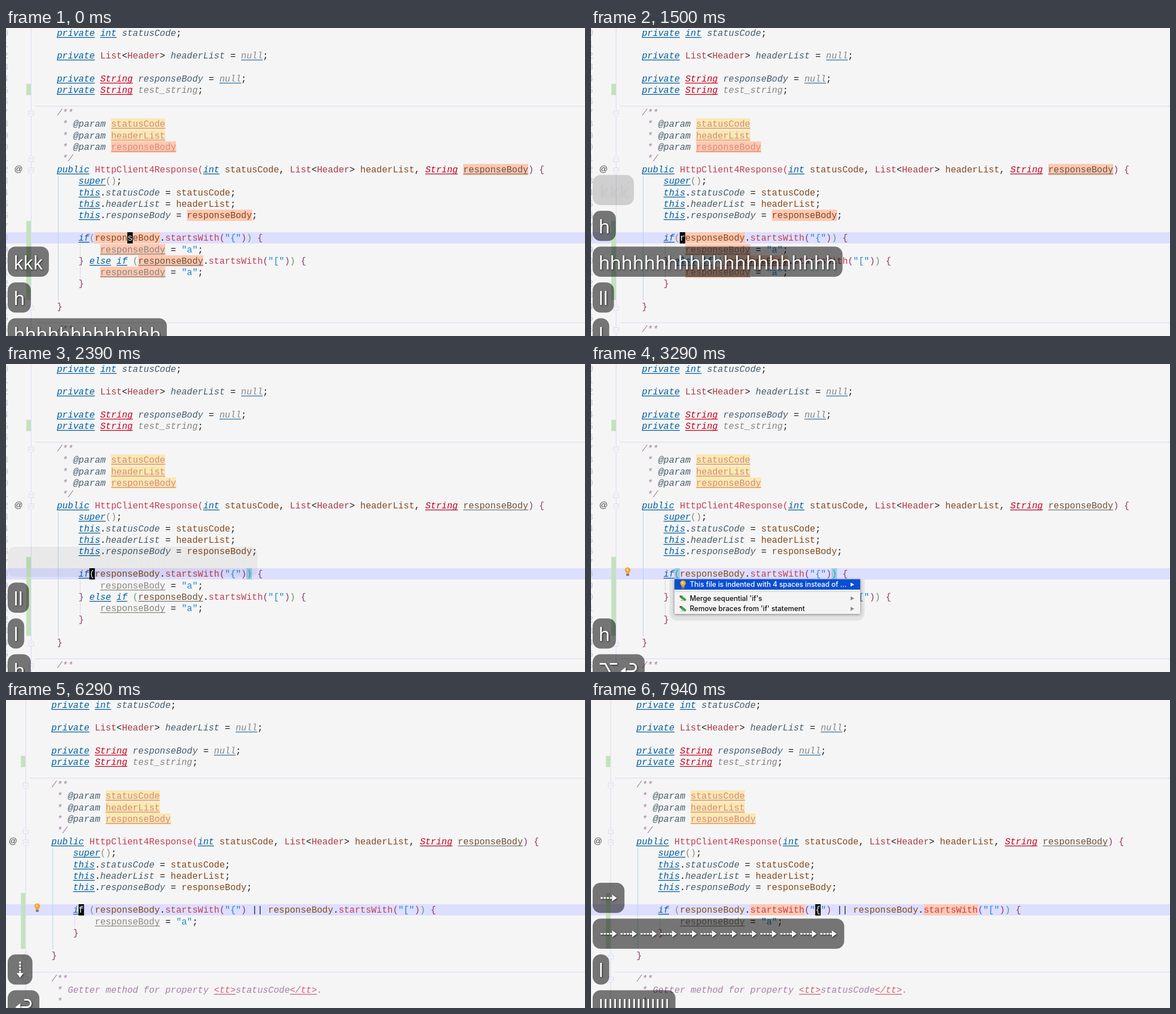
These frames come from a looping animation (1026 by 546 pixels, 8 s). An HTML page with a canvas:

```html
<!DOCTYPE html>
<html lang="en">
<head>
<meta charset="utf-8">
<title>Merging sequential ifs</title>
<style>
  html, body { margin: 0; width: 100%; height: 100%; overflow: hidden; background: #f5f5f5; }
  canvas { display: block; }
</style>
</head>
<body>
<canvas id="stage" width="1026" height="546"></canvas>
<script>
const ctx = document.getElementById('stage').getContext('2d');
const LOOP = 8000, MERGED = 5540, MENU = 2990;
const CHAR = 9.6, ROW = 20.2, CARET_ROW = 18;
const BG = '#f5f5f5', LAVENDER = '#d9d9f6', SALMON = '#ffc9b3';
const CODE = '16px "Liberation Mono", monospace';
const KEYS = '32.5px "Noto Sans", sans-serif';

// Moments at which the picture changes.
const steps = [0, 150, 300, 600, 750, 1050, 1500, 1650, 1800, 1950, 2240, 2390, 2540, 2690, 2840,
  2990, 3140, 3290, 3740, 3890, 4790, 4940, 5540, 5840, 6290, 6740, 6890, 7040, 7190, 7490, 7640, 7790, 7940];

// [time, caret column, highlighted word]
const carets = [
  [0, 13, 'responseBody'], [150, 8, 'responseBody'], [300, 4], [600, 5], [750, 6], [1050, 7],
  [1500, 7, 'responseBody'], [1950, 6], [MENU, -1], [MERGED, 5], [6740, 6], [6890, 10], [7040, 14],
  [7190, 18, 'responseBody'], [7490, 19, 'responseBody'], [7640, 23],
  [7790, 28, 'startsWith'], [7940, 33, 'startsWith']
];

// key, [time, repeat count] pairs, time when fully faded
const bubbles = [
  ['k', [[-2, 3]], 1560],
  ['h', [[-1, 1]], 1760],
  ['h', [[0, 13], [150, 17], [300, 21]], 2410],
  ['l', [[600, 1], [750, 2]], 2880],
  ['l', [[1050, 1]], 3220],
  ['h', [[1950, 1]], 3830],
  ['⌥↩', [[2840, 1]], 4850],
  ['⇣', [[4940, 1]], 6850],
  ['↩', [[MERGED, 1]], 7580],
  ['⇢', [[6740, 1]], 9000],
  ['⇢', [[6890, 4], [7040, 8], [7190, 12]], 9000],
  ['l', [[7490, 1]], 9500],
  ['l', [[7640, 5], [7790, 10], [7940, 15]], 9500]
];

// style letter: [colour, italic, underline colour, background]
const styles = {
  k: ['#005f9f', 1, '#005f9f'], S: ['#c4001f', 1, '#c4001f'], n: ['#858585', 1, '#2f74a8'],
  t: ['#a93a48'], f: ['#465d6c', 1], g: ['#848484', 1], c: ['#a67fa8', 1], a: ['#465d6c', 1],
  d: ['#d98878', 0, '#d98878', '#f8e9b4'], x: ['#d0607a', 1, '#d0607a'], m: ['#c03e57'],
  v: ['#84491f'], u: ['#8b857e', 0, '#8b857e'], w: ['#6f5138', 0, '#777777'], p: ['#1c1c1c'],
  b: ['#8c3c68'], q: ['#2188d6'], e: ['#5d9d6c'], o: ['#8d8a80']
};

// Segments are split by "¦"; the first letter of each is its style.
const shared = {
  0: 'kprivate¦p ¦kint¦p ¦fstatusCode¦p;',
  2: 'kprivate¦p ¦tList¦p<¦tHeader¦p> ¦fheaderList¦p = ¦nnull¦p;',
  4: 'kprivate¦p ¦SString¦p ¦fresponseBody¦p = ¦nnull¦p;',
  5: 'kprivate¦p ¦SString¦p ¦gtest_string¦p;',
  7: 'c/**',
  8: 'c * ¦a@param¦p ¦dstatusCode',
  9: 'c * ¦a@param¦p ¦dheaderList',
  10: 'c * ¦a@param¦p ¦dresponseBody',
  11: 'c */',
  12: 'kpublic¦p ¦mHttpClient4Response(¦kint¦p ¦vstatusCode¦p, ¦tList¦p<¦tHeader¦p> ¦vheaderList¦p, ¦SString¦p ¦wresponseBody¦b) {',
  13: 'p    ¦ksuper¦o()¦p;',
  14: 'p    ¦kthis¦p.¦fstatusCode¦p = ¦vstatusCode¦p;',
  15: 'p    ¦kthis¦p.¦fheaderList¦p = ¦vheaderList¦p;',
  16: 'p    ¦kthis¦p.¦fresponseBody¦p = ¦vresponseBody¦p;',
  19: 'p        ¦uresponseBody¦p = ¦q"a"¦p;'
};
const before = { ...shared,
  18: 'p    ¦kif¦o(¦vresponseBody¦p.¦mstartsWith¦b(¦q"{"¦b)¦e)¦b {',
  20: 'p    ¦b}¦p ¦kelse¦p ¦kif¦p ¦e(¦wresponseBody¦p.¦mstartsWith¦b(¦q"["¦b)¦e)¦b {',
  21: shared[19],
  22: 'p    ¦b}',
  24: 'b}',
  26: 'c/**'
};
const after = { ...shared,
  18: 'p    ¦kif¦p ¦o(¦vresponseBody¦p.¦mstartsWith¦b(¦q"{"¦b)¦p || ¦vresponseBody¦p.¦mstartsWith¦b(¦q"["¦b)¦e)¦b {',
  20: 'p    ¦b}',
  22: 'b}',
  24: 'c/**',
  25: 'c * Getter method for property ¦x<tt>¦cstatusCode¦x</tt>¦c.',
  26: 'c *'
};

const latest = (table, t) => table.filter(entry => entry[0] <= t).pop();
const rowTop = row => Math.round(ROW * row - 1.2);

function rect(color, x, y, w, h) {
  ctx.fillStyle = color;
  ctx.fillRect(x, y, w, h);
}
function poly(points) {
  ctx.beginPath();
  points.forEach(([x, y]) => ctx.lineTo(x, y));
  ctx.closePath();
}
function write(string, x, y, color, font, align = 'left') {
  ctx.font = font;
  ctx.fillStyle = color;
  ctx.textAlign = align;
  ctx.fillText(string, x, y);
}
function cell(color, x0, row, col, length = 1) {
  rect(color, x0 + col * CHAR, rowTop(row), length * CHAR, 20);
}

function drawLine(source, row, x0, word, dullBrackets) {
  let col = 0;
  for (const part of source.split('¦')) {
    const string = part.slice(1);
    const dull = dullBrackets && 'beo'.includes(part[0]);
    const [color, italic, underline, back] = styles[dull ? 'p' : part[0]];
    const x = x0 + col * CHAR, y = rowTop(row);
    const marked = string === word && part[0] !== 'f';
    if (marked || back) cell(marked ? SALMON : back, x0, row, col, string.length);
    write(string, x, y + 15, color, (italic ? 'italic ' : '') + CODE);
    if (underline) rect(underline, x, y + 17, string.length * CHAR, 1.3);
    col += string.length;
  }
}

function foldMark(x, y, up) {
  const s = up ? -1 : 1;
  poly([[x - 4.5, y - 5 * s], [x + 4.5, y - 5 * s], [x + 4.5, y + 2 * s], [x, y + 6 * s], [x - 4.5, y + 2 * s]]);
  ctx.fillStyle = BG;
  ctx.fill();
  ctx.strokeStyle = LAVENDER;
  ctx.lineWidth = 1;
  ctx.stroke();
  rect(LAVENDER, x - 2.5, y - 1, 5, 1);
}

function bulb(x, y) {
  ctx.fillStyle = '#f2a535';
  ctx.beginPath();
  ctx.arc(x, y - 2.5, 5, 0, 7);
  ctx.fill();
  rect('#f2a535', x - 2.5, y, 5, 4);
  rect('#fbd38a', x - 2, y - 5, 3, 4);
  rect('#777', x - 2.5, y + 4, 5, 3.5);
}

function pencil(x, y) {
  poly([[x - 5, y - 4], [x - 2, y - 5], [x + 6, y + 2], [x + 4, y + 5], [x - 4, y]]);
  ctx.fillStyle = '#37a449';
  ctx.fill();
  rect('#a33d33', x - 6, y - 5, 3, 3);
  rect('#b5b5b5', x - 4, y + 3, 6, 1.5);
}

function drawMenu(selected) {
  ctx.fillStyle = 'rgba(0,0,0,.07)';
  ctx.beginPath();
  ctx.roundRect(139, 382, 346, 73, [0, 0, 14, 14]);
  ctx.fill();
  ctx.save();
  ctx.shadowColor = 'rgba(0,0,0,.45)';
  ctx.shadowBlur = 5;
  ctx.shadowOffsetY = 1;
  rect('#f4f4f4', 148, 382, 329, 61);
  ctx.restore();
  rect('#cfcfcf', 148, 403, 329, 1);
  const items = [
    ['This file is indented with 4 spaces instead of ...', 391, bulb],
    ["Merge sequential 'if's", 415.5, pencil],
    ["Remove braces from 'if' statement", 434, pencil]
  ];
  items.forEach(([label, y, icon], i) => {
    const on = i === selected;
    if (on) rect('#0a4fd3', 148, y - 9.5, 329, 18.5);
    icon(163, y);
    write(label, 175, y + 4.3, on ? '#fff' : '#111', '500 12.4px Inter, sans-serif');
    poly([[460, y - 3.5], [466.5, y], [460, y + 3.5]]);
    ctx.fillStyle = on ? '#fff' : '#8a8a8a';
    ctx.fill();
  });
}

function strokePath(points) {
  ctx.beginPath();
  points.forEach(([x, y]) => ctx.lineTo(x, y));
  ctx.stroke();
}
function dashedArrow() {
  for (let i = 0; i < 4; i++) ctx.fillRect(3.5 + i * 5.5, -1.5, 4, 3);
  poly([[24, -6], [32.5, 0], [24, 6]]);
  ctx.fill();
}
// Key symbols: [advance, painter around the vertical centre]
const symbols = {
  '⇢': [35.4, dashedArrow],
  '⇣': [23, () => {
    ctx.translate(11.5, -18);
    ctx.rotate(Math.PI / 2);
    dashedArrow();
  }],
  '↩': [35.2, () => {
    ctx.beginPath();
    ctx.moveTo(10, 3);
    ctx.lineTo(24, 3);
    ctx.arc(24, -3.5, 6.5, Math.PI / 2, -Math.PI / 2, true);
    ctx.lineTo(19, -10);
    ctx.stroke();
    poly([[3, 3], [12, -4], [12, 10]]);
    ctx.fill();
  }],
  '⌥': [36, () => {
    strokePath([[2, -10], [12, -10], [23, 10], [33, 10]]);
    strokePath([[20, -10], [33, -10]]);
  }]
};

function drawBubble(label, y, alpha) {
  ctx.save();
  ctx.font = KEYS;
  ctx.textAlign = 'left';
  const advance = key => symbols[key] ? symbols[key][0] : ctx.measureText(key).width;
  const width = [...label].reduce((sum, key) => sum + advance(key), 20.9);
  ctx.globalAlpha = alpha;
  ctx.fillStyle = 'rgba(0,0,0,.52)';
  ctx.beginPath();
  ctx.roundRect(3, y, width, 53.5, 14);
  ctx.fill();
  ctx.globalAlpha = alpha * alpha;
  ctx.shadowColor = 'rgba(0,0,0,.7)';
  ctx.shadowBlur = 3;
  ctx.shadowOffsetX = ctx.shadowOffsetY = 1;
  ctx.strokeStyle = '#fff';
  ctx.lineWidth = 3;
  let x = 13.45;
  for (const key of label) {
    if (symbols[key]) {
      ctx.save();
      ctx.fillStyle = '#fff';
      ctx.translate(x, y + 27);
      symbols[key][1]();
      ctx.restore();
    } else write(key, x, y + 40, '#fff', KEYS);
    x += advance(key);
  }
  ctx.restore();
}

function drawBubbles(t) {
  const shown = bubbles.filter(([, counts]) => counts[0][0] <= t);
  shown.forEach(([key, counts, end], i) => {
    const alpha = Math.min(1, (end - t) / 200);
    if (alpha <= 0) return;
    const slot = shown.length - 1 - i;
    drawBubble(key.repeat(latest(counts, t)[1]), 514.5 - 63.5 * slot, alpha);
  });
}

function drawGutter(merged, shift) {
  const edge = 44.5 - shift;
  const lastRow = merged ? 22 : 24;
  rect('#c4e2be', edge - 8.5, 99, 8, 20);
  rect('#c4e2be', edge - 8.5, 342, 8, merged ? 99 : 140);
  rect(LAVENDER, edge - .5, 0, 1, 546);
  for (const row of [7, lastRow + 2]) rect(LAVENDER, 52 - shift, rowTop(row) - 2, 1026, 1);
  for (const row of [7, 12, lastRow + 2]) foldMark(edge, rowTop(row) + 12, false);
  for (const row of [11, lastRow]) foldMark(edge, rowTop(row) + 11, true);
  if (!merged) {
    for (let row = 0; row < 27; row++) write(row % 10, 4, rowTop(row) + 15, '#c3c3d6', CODE, 'right');
  }
  write('@', 22 - shift, 255, '#4a4a4a', '15px "Liberation Sans", sans-serif', 'center');
  rect('#a9d6ec', 92 - shift, 262, 1, merged ? 179 : 221);
  rect('#d3d9e0', 131 - shift, 383, 1, 20);
  if (!merged) rect('#d3d9e0', 131, 423, 1, 20);
}

function draw(t) {
  const merged = t >= MERGED, menu = t >= MENU && !merged;
  const shift = merged ? 9.6 : 0, x0 = 90.2 - shift;
  const lines = merged ? after : before;
  const [, caret, word] = latest(carets, t);

  rect(BG, 0, 0, 1026, 546);
  rect('#dedeff', 0, 362, 1026, 20);
  drawGutter(merged, shift);
  if (!merged && (caret === 6 || menu)) {
    for (const col of [6, 35]) cell('#93cdf0', x0, CARET_ROW, col);
  }
  for (const row in lines) {
    drawLine(lines[row], +row, x0, word, merged && t < 5840 && row >= CARET_ROW && row <= 20);
  }
  if (caret >= 0) {
    const plain = lines[CARET_ROW].split('¦').map(part => part.slice(1)).join('');
    cell('#000', x0, CARET_ROW, caret);
    write(plain[caret], x0 + caret * CHAR, rowTop(CARET_ROW) + 15, '#fff', CODE);
  }
  if ((t >= 2690 && !merged) || (t >= 6290 && t < 6740)) bulb(65 - shift, 368);
  if (menu) drawMenu(t < 4940 ? 0 : 1);
  drawBubbles(t);
}

const startTime = performance.now();
function tick() {
  const t = (performance.now() - startTime) % LOOP;
  draw(steps.filter(step => step <= t).pop());
  requestAnimationFrame(tick);
}
tick();
</script>
</body>
</html>
```
